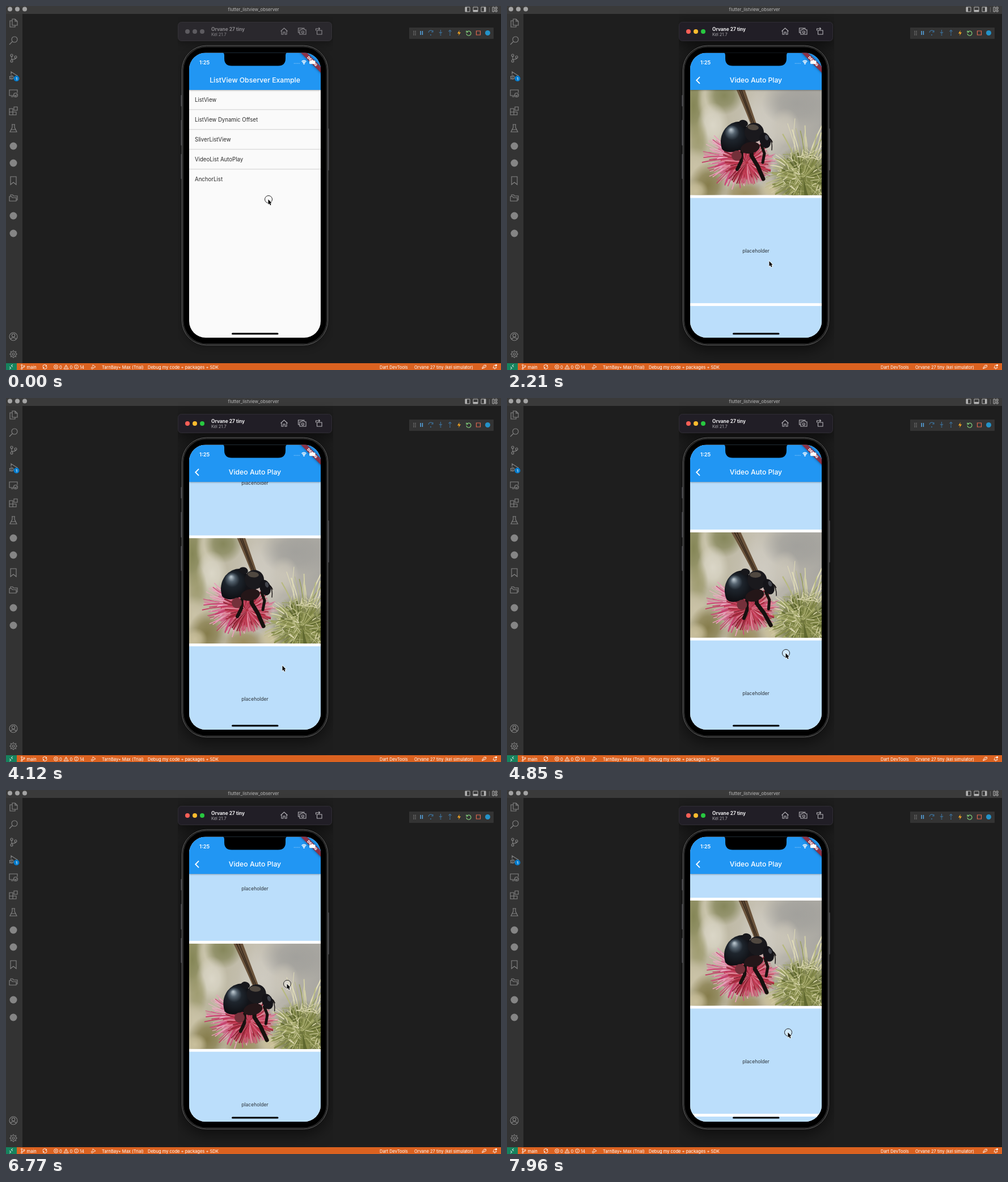
An HTML page with a canvas for the animation above (8 s loop, 873x642 px).

```html
<!DOCTYPE html>
<html lang="en">
<head>
<meta charset="utf-8">
<title>Video list demo</title>
<style>
html, body { margin: 0; width: 100%; height: 100%; overflow: hidden; background: #1e1e1e; }
canvas { display: block; width: 873px; height: 642px; }
</style>
</head>
<body>
<canvas id="stage"></canvas>
<script>
const W = 873, H = 642, LOOP = 8000, TICK = 147.3;
const SANS = 'Inter, Roboto, "Open Sans", sans-serif';
const SCREEN = { x: 323, y: 82.5, w: 232, h: 502.5, r: 29 };
const BAR_END = 148, ITEM = 185.6, PITCH = 190.55;
const canvas = document.getElementById('stage');
const dpr = window.devicePixelRatio || 1;
canvas.width = W * dpr;
canvas.height = H * dpr;
const c = canvas.getContext('2d');

// Tracks: [tick, values...]
const cursorTrack = [
  [0, 463, 341], [2, 463, 341], [7, 463, 274], [13, 463, 274], [15, 463, 450], [17, 463, 450],
  [21, 473.5, 398], [24, 480, 345], [25, 482, 352], [28, 488, 472], [30, 488, 472], [33, 492, 450],
  [37, 506, 262], [38, 506.5, 270], [43, 500, 312], [45, 496, 342], [46, 496, 342],
  [50, 496, 258], [53, 496, 428], [54, 496, 427.5]
];
const scrollTrack = [
  [0, 0], [17, 0], [21, 38], [24, 91.2], [30, 91.2], [33, 101.5], [38, 101.5], [43, 67.5],
  [46, 67.5], [50, 142.5], [53, 142.5], [54, 143.6]
];
const pageTrack = [[9, 0], [10, .3], [11, .75], [12, .94], [13, 1]];
// Bee pose: x, y, tilt
const beeTrack = [
  [14, 0, 0, 0], [15, 0, 0, 0], [21, 7, 10, -.14], [23.9, 4, 6, -.08], [24, 1, -2, 0],
  [28, 2, -2, 0], [33, 6, 10, -.1], [38, 3, 7, .05], [46, 6, 14, -.03], [54, 6, 5, 0]
];
const presses = [[0, 0], [8, 9], [17, 24], [30, 33], [37, 43], [46, 50], [53, 54]];

function sample(track, n) {
  if (n <= track[0][0]) return track[0].slice(1);
  for (let i = 1; i < track.length; i++) {
    const a = track[i - 1], b = track[i];
    if (n <= b[0]) {
      const k = (n - a[0]) / (b[0] - a[0]);
      return a.slice(1).map((v, j) => v + (b[j + 1] - v) * k);
    }
  }
  return track[track.length - 1].slice(1);
}

function seeded(seed) {
  return () => (seed = (seed * 16807) % 2147483647) / 2147483647;
}

function rect(x, y, w, h, fill) {
  c.fillStyle = fill;
  c.fillRect(x, y, w, h);
}

function round(x, y, w, h, r, fill, stroke, lw = 1) {
  c.beginPath();
  c.roundRect(x, y, w, h, r);
  if (fill) { c.fillStyle = fill; c.fill(); }
  if (stroke) { c.strokeStyle = stroke; c.lineWidth = lw; c.stroke(); }
}

function oval(x, y, rx, ry, fill, tilt = 0) {
  c.beginPath();
  c.ellipse(x, y, rx, ry, tilt, 0, 7);
  c.fillStyle = fill;
  c.fill();
}

const dot = (x, y, r, fill) => oval(x, y, r, r, fill);

function text(str, x, y, size, color, align = 'left', weight = 400) {
  c.font = `${weight} ${size}px ${SANS}`;
  c.textAlign = align;
  c.textBaseline = 'alphabetic';
  c.fillStyle = color;
  c.fillText(str, x, y);
}

function icon(d, x, y, color, lw = 1.1, solid = false) {
  const path = new Path2D(d);
  c.save();
  c.translate(x, y);
  c.lineWidth = lw;
  c.strokeStyle = c.fillStyle = color;
  if (solid) c.fill(path); else c.stroke(path);
  c.restore();
}

const ring = (x, y, r) => `M${x + r} ${y}a${r} ${r} 0 1 0 ${-2 * r} 0a${r} ${r} 0 1 0 ${2 * r} 0`;

const BRANCH = ring(-3, -5, 2) + ring(-3, 5, 2) + ring(4, -2, 2) + 'M-3 -3V3M4 0C4 3 -1 1 -3 3';
const BOLT = 'M1 -5L-3 1H0L-1 5L3 -1H0Z';
const SIDE_ICONS = [
  [30, 'M-2 -7H3L7 -3V4H-2ZM3 -7V-3H7M-2 -4H-6V7H3V4'],
  [61, ring(2, -2, 5) + 'M-2 2L-7 7'],
  [92, BRANCH],
  [123, 'M-4 -2V-7L7 0L2 3' + ring(-3, 3, 3) + 'M-3 0V6M-7 1L-6 2M-7 6L-6 5M-7 3H-6'],
  [154, 'M0 4H-7V-6H7V-1M-4 6H0' + ring(4, 3, 3.5) + 'M2 3L4 5L6 2'],
  [185, 'M-7 -4H-1V2H5V7H-7ZM-7 2H-1V7M1 -7H7V-1H1Z'],
  [216, 'M-3 -7H3M-2 -7V-2L-6 6H6L2 -2V-7M-4 2H4'],
  [308, 'M-5 -7H5V7L0 3L-5 7Z'],
  [339, 'M-7 5V-3H-3L-2 -1H5V5ZM-5 -3V-6H-1L0 -4H7V3H5'],
  [583, ring(0, 0, 7) + ring(0, -2, 2.7) + 'M-4.5 5C-4 1 4 1 4.5 5'],
  [614, ring(0, 0, 5) + ring(0, 0, 2) + 'M0 -7V-5M0 5V7M-7 0H-5M5 0H7M-5 -5L-3.6 -3.6M5 5L3.6 3.6M-5 5L-3.6 3.6M5 -5L3.6 -3.6']
];

function drawEditor() {
  rect(0, 0, W, H, '#1e1e1e');
  rect(0, 14, 29, 616, '#333333');
  for (const [y, d] of SIDE_ICONS) icon(d, 13, y, '#858585');
  for (const y of [247, 277, 370, 401]) dot(13, y, 6.5, '#858585');
  dot(18.5, 128, 5, '#007acc');
  text('1', 18.5, 130.5, 6.5, '#fff', 'center', 600);

  round(711, 38, 149, 20, 1, '#333333');
  for (let i = 0; i < 6; i++) rect(718.5 + (i % 2) * 3, 44 + (i >> 1) * 3, 1.3, 1.3, '#999');
  rect(730.5, 44, 1.5, 7, '#58a9e8');
  rect(733.7, 44, 1.5, 7, '#58a9e8');
  icon('M-4 0C-3 -5 3 -5 4 -1M4 -4V-1H1', 749, 47, '#3c6f98');
  icon('M0 -5V1M-2.5 -1L0 1.5L2.5 -1', 766.5, 47, '#3c6f98');
  icon('M0 2V-4M-2.5 -2L0 -4.5L2.5 -2', 783, 47, '#3c6f98');
  for (const x of [749, 766.5, 783]) dot(x, 51, 1.1, '#3c6f98');
  icon(BOLT, 799, 47.5, '#f5a623', 1, true);
  icon('M-3 -2A4 4 0 1 1 -4 1M-4 -4V-1.5H-1', 816, 47.5, '#7cc576', 1.3);
  icon('M-3.5 -3.5H3.5V3.5H-3.5Z', 833, 47.5, '#e0684f', 1.2);
  dot(849.5, 47.5, 4.5, '#2492c8');
}

function drawBars() {
  rect(0, 0, W, 14, '#3a3a3a');
  for (const x of [7, 20, 33]) dot(x, 5.5, 4, '#a3a3a3');
  text('flutter_listview_observer', 436.5, 9, 7.8, '#b9b9b9', 'center');
  for (const x of [814, 828, 842]) icon('M-4 -4H4V4H-4Z', x, 6, '#b4b4b4', 1);
  rect(810, 2, 3, 8, '#b4b4b4');
  rect(824, 7, 8, 3, '#b4b4b4');
  rect(843, 2, 3, 8, '#b4b4b4');
  rect(852, 2, 1, 9, '#666');
  icon('M-4 -4H-1V4H-4ZM1 -4H4V-1H1ZM1 1H4V4H1Z', 862, 6, '#b4b4b4', 1);

  const white = '#fff', y = 639.5;
  rect(0, 630, W, 12, '#db6220');
  rect(0, 630, 19, 12, '#16825d');
  icon('M-3 0L0 2L-3 4M3 -4L0 -2L3 0', 9, 636.5, white, .9);
  c.save();
  c.translate(29.5, 636.5);
  c.scale(.6, .6);
  icon(BRANCH, 0, 0, white, 1.4);
  c.restore();
  text('main', 36.5, y, 7.6, white);
  icon('M-3.5 0A3 3 0 0 1 3 -1M3.5 0A3 3 0 0 1 -3 1M3 -3V-1H1M-3 3V1H-1', 68.5, 636.5, white, .9);
  icon(ring(0, 0, 3.5) + 'M-1.5 -1.5L1.5 1.5M1.5 -1.5L-1.5 1.5', 88, 636.5, white, .8);
  text('0', 94, y, 7.6, white);
  icon('M0 -3.5L4 3.5H-4ZM0 -1V1.5M0 2V3', 106, 636.5, white, .8);
  text('0', 112.5, y, 7.6, white);
  icon(ring(0, 0, 3.5) + 'M0 -.5V2M0 -2V-1', 124, 636.5, white, .8);
  text('14', 130, y, 7.6, white);
  icon('M-1 -3.5L4 0L0 2M-1 -3.5V-1' + ring(-2, 2, 1.6), 154, 636.5, white, .8);
  text('TarnBay+ Max (Trial)', 169, y, 7.5, white);
  text('Debug my code + packages + SDK', 250, y, 7.55, white);
  text('Dart DevTools', 659, y, 7.5, white);
  text('Orvane 27 tiny (kel simulator)', 720, y, 7.5, white);
  icon('M-3 3V1L0 -3H3.5V0L0 2H-1ZM-3.5 3.5L2 -2', 843, 636.5, white, .8);
  icon('M-3 2C-2 0 -2 -3 0 -3C2 -3 2 0 3 2ZM-1 3.5H1', 862, 636.5, white, .8);
  dot(864.5, 633.5, 1.6, white);
}

function drawDevice(focused) {
  c.save();
  c.beginPath();
  c.rect(303, 7, 274, 623);
  c.clip();
  c.shadowColor = focused ? 'rgba(0,0,0,.6)' : 'rgba(0,0,0,.3)';
  c.shadowBlur = focused ? 28 : 14;
  c.shadowOffsetY = focused ? 8 : 4;
  round(303.5, 28, 271.5, 34, 6, '#222');
  round(311, 70, 256, 527.5, 42, '#000');
  c.restore();

  round(303.5, 28.5, 271, 33, 6, focused ? '#211e26' : '#2a282d', focused ? '#2f2d34' : '#343237');
  const lights = focused ? ['#ff5f57', '#febc2e', '#28c840'] : Array(3).fill('#5d5b60');
  lights.forEach((color, i) => dot(320 + i * 13, 45, 4, color));
  text('Orvane 27 tiny', 362, 44, 8.3, focused ? '#efeef0' : '#88868a', 'left', 700);
  text('Kel 21.7', 362, 53, 7.4, focused ? '#aaa8ad' : '#88868a');
  const tint = focused ? '#b5b3b8' : '#8e8c91';
  icon('M-6 0L0 -5.5L6 0M-4.5 -1V5.5H-1.5V1.5H1.5V5.5H4.5V-1', 490.5, 44.5, tint);
  icon('M-4 -2.5H-1L0 -4H4L5 -2.5H7V5.5H-4ZM-4 2.5H-6.5V-5.5H4.5' + ring(1.5, 1.5, 2), 522, 44.5, tint);
  icon('M-3.5 -1.5H5V5.5H-3.5ZM-5.5 -1V-4.5H1.5M-.5 -6.5L1.5 -4.5L-.5 -2.5', 552, 44.5, tint);

  for (const [x, y, h] of [[308, 157, 20], [308, 201, 45], [308, 261, 44], [567.5, 216, 74]])
    round(x, y, 2.5, h, 1, '#39393c');
  round(310.5, 70, 257, 528, 43, '#000', '#6c6c6c', 1);
  round(312.5, 72, 253, 524, 41, null, '#2c2c2c', 1.6);
}

function appBar(title, back) {
  const s = SCREEN;
  c.save();
  c.shadowColor = 'rgba(0,0,0,.4)';
  c.shadowBlur = 3;
  c.shadowOffsetY = 1;
  rect(s.x, s.y, s.w, BAR_END - s.y, '#2196f3');
  c.restore();
  text(title, 439, 135, 12.2, '#fff', 'center', 500);
  if (back) icon('M3 -5.8L-2.8 0L3 5.8', 337, 131, '#fff', 1.8);
}

function drawMenu() {
  rect(SCREEN.x, SCREEN.y, SCREEN.w, SCREEN.h, '#fafafa');
  const rows = ['ListView', 'ListView Dynamic Offset', 'SliverListView', 'VideoList AutoPlay', 'AnchorList'];
  rows.forEach((label, i) => {
    text(label, 333, 169 + i * 35, 9.65, '#2b2b2b');
    if (i < 4) rect(SCREEN.x, 182.3 + i * 35, SCREEN.w, 1, '#cfcfcf');
  });
  appBar('ListView Observer Example', false);
}

function glow(x, y, rx, ry, rgb, a = .9) {
  const g = c.createRadialGradient(0, 0, 0, 0, 0, 1);
  g.addColorStop(0, `rgba(${rgb},${a})`);
  g.addColorStop(.5, `rgba(${rgb},${a * .75})`);
  g.addColorStop(1, `rgba(${rgb},0)`);
  c.save();
  c.translate(x, y);
  c.scale(rx, ry);
  rect(-1, -1, 2, 2, g);
  c.restore();
}

function rays(x, y, count, from, to, colors, rnd, lw, a0 = 0, a1 = 6.283) {
  for (let i = 0; i < count; i++) {
    const a = a0 + (a1 - a0) * (i + rnd()) / count;
    const r = to * (.45 + .55 * rnd()), bend = a + .3 * (rnd() - .5);
    const mid = (from + r) / 2;
    c.beginPath();
    c.moveTo(x + Math.cos(a) * from, y + Math.sin(a) * from * .85);
    c.quadraticCurveTo(x + Math.cos(a) * mid, y + Math.sin(a) * mid * .85,
      x + Math.cos(bend) * r, y + Math.sin(bend) * r * .85);
    c.strokeStyle = colors[Math.floor(rnd() * colors.length)];
    c.lineWidth = lw * (.5 + .9 * rnd());
    c.stroke();
  }
}

function drawBackdrop() {
  const bg = c.createLinearGradient(0, 0, SCREEN.w, 40);
  bg.addColorStop(0, '#b3ad8e');
  bg.addColorStop(.5, '#c6c1b3');
  bg.addColorStop(1, '#aaa8a2');
  rect(0, 0, SCREEN.w, ITEM, bg);
  glow(6, 28, 22, 60, '128,130,80');
  glow(30, 18, 18, 40, '205,200,176');
  glow(60, 10, 34, 34, '128,130,84');
  glow(40, 62, 28, 40, '222,218,204');
  glow(14, 88, 18, 40, '150,148,98', .7);
  glow(130, 62, 44, 60, '208,204,194');
  glow(188, 24, 62, 42, '160,159,155');
  glow(168, 66, 26, 34, '202,197,184');
  glow(8, 135, 30, 34, '204,196,168');
  glow(32, 168, 34, 40, '128,118,66');
  glow(10, 178, 22, 20, '205,195,160');
  glow(96, 182, 40, 24, '150,135,84');
  glow(146, 176, 26, 20, '205,194,150');
  glow(208, 168, 62, 56, '98,104,50');
}

function drawThistle(rnd) {
  const pale = ['#d6d3a6', '#b7b981', '#e0dcb8', '#9aa062'];
  const deep = ['#5f682f', '#7b8243', '#a3a768', '#878c4c'];
  rays(198, 160, 24, 30, 130, pale, rnd, 1.6, 4.35, 5.45);
  glow(198, 152, 56, 54, '112,118,60', 1);
  rays(198, 158, 90, 4, 58, deep, rnd, 3);
  for (let i = 0; i < 26; i++)
    rays(160 + rnd() * 70, 112 + rnd() * 72, 5, 1, 17, pale, rnd, 1.1);
  rays(190, 150, 40, 30, 66, pale, rnd, 1.2, 2.3, 4.6);
}

function drawFlower(rnd) {
  const pinks = ['#dd7ba0', '#e9b0c2', '#cf4f80', '#e8a0ba', '#c23a64'];
  const reds = ['#d0506f', '#a3293c', '#c23850', '#e08b9c', '#8c2334'];
  glow(88, 118, 52, 46, '205,90,125', .75);
  rays(90, 120, 110, 16, 70, pinks, rnd, 1.3, 1.5, 3.9);
  rays(100, 124, 60, 16, 54, pinks, rnd, 1.3, -.4, 1.7);
  glow(100, 130, 46, 38, '176,44,62', 1);
  rays(100, 128, 110, 3, 48, reds, rnd, 1.8);
}

function drawBee() {
  icon('M72 -22L89 -22Q104 22 117 60L107 61Q96 32 72 -22Z', 0, 0, '#6a533b', 1, true);
  icon('M84 -18Q98 22 112 58M80 -16Q98 24 109 58', 0, 0, '#35281d', 1.6);
  c.lineCap = c.lineJoin = 'round';
  icon('M103 92L91 110L90 126L83 140', 0, 0, '#17110f', 6);
  icon('M110 96L108 116L119 134L129 157', 0, 0, '#17110f', 7);
  icon('M126 98L131 112L128 128', 0, 0, '#17110f', 5);
  icon('M139 84Q146 92 144 106M136 82Q143 86 145 92', 0, 0, '#181414', 1.4);
  const shell = c.createRadialGradient(72, 70, 1, 76, 82, 28);
  shell.addColorStop(0, '#b4c0c8');
  shell.addColorStop(.2, '#55636f');
  shell.addColorStop(.45, '#1e252d');
  shell.addColorStop(1, '#0e0e12');
  oval(96, 90, 20, 18, '#141318');
  icon('M56 104Q50 84 62 68Q74 54 92 56Q104 64 99 88Q94 106 78 109Q62 112 56 104Z', 0, 0, shell, 1, true);
  oval(94, 59, 8, 6, '#17171b', .3);
  dot(113, 75, 17, '#1a191d');
  oval(111, 66, 10, 5, '#504840', .1);
  oval(132, 89, 9.5, 14, '#151419', -.3);
  oval(135, 84, 3, 5, '#42444c', -.3);
  oval(106, 102, 17, 10, '#241618', -.2);
  oval(82, 116, 9, 9, '#74303a', .4);
}

function drawVideo(top, n) {
  const [dx, dy, tilt] = sample(beeTrack, n);
  const rnd = seeded(77);
  c.save();
  c.translate(SCREEN.x, top);
  c.beginPath();
  c.rect(0, 0, SCREEN.w, ITEM);
  c.clip();
  drawBackdrop();
  drawThistle(rnd);
  c.save();
  c.translate(dx, dy * .7);
  drawFlower(rnd);
  c.restore();
  c.translate(100 + dx, 83 + dy);
  c.rotate(tilt);
  c.translate(-100, -83);
  drawBee();
  c.restore();
}

function drawVideos(n) {
  const s = SCREEN, [scroll] = sample(scrollTrack, n);
  const playing = n < 13 ? -1 : n < 24 ? 0 : 1;
  rect(s.x, s.y, s.w, s.h, '#fff');
  for (let i = 0; i < 4; i++) {
    const top = BAR_END + i * PITCH - scroll;
    if (i === playing) { drawVideo(top, n); continue; }
    rect(s.x, top, s.w, ITEM, '#bbdefb');
    text('placeholder', 439, top + ITEM / 2 + 3.2, 8.5, '#2b3238', 'center');
  }
  appBar('Video Auto Play', true);
}

function drawOverlay() {
  const s = SCREEN;
  text('1:25', 341, 102.8, 9.2, '#fff', 'left', 600);
  for (let i = 0; i < 4; i++) dot(508.5 + i * 2.8, 101.3, .7, 'rgba(255,255,255,.5)');
  icon('M-4 -1.5Q0 -5 4 -1.5M-2.5 .5Q0 -1.7 2.5 .5', 525.5, 99.5, '#fff', 1.5);
  dot(525.5, 101.7, 1.3, '#fff');
  c.save();
  c.translate(s.x + s.w, s.y);
  c.rotate(Math.PI / 4);
  c.scale(.6187, .6187);
  c.shadowColor = 'rgba(0,0,0,.5)';
  c.shadowBlur = 4;
  rect(-45, 28, 90, 12, '#8c3247');
  c.shadowBlur = 0;
  text('DEBUG', 0, 37.7, 10.2, '#fff', 'center', 900);
  c.restore();
  round(535, 96.3, 10.5, 6, 1.6, '#fff');
  round(398, 576.6, 82.5, 3, 1.5, '#000');
  icon('M-58 -1Q-54 0 -54 5V10Q-54 23 -41 23H41Q54 23 54 10V5Q54 0 58 -1Z', 439, 82.5, '#000', 1, true);
}

function drawCursor(n) {
  const [x, y] = sample(cursorTrack, n);
  if (presses.some(([a, b]) => n >= a && n <= b)) {
    c.beginPath();
    c.arc(x, y, 6.5, 0, 7);
    c.fillStyle = 'rgba(255,255,255,.3)';
    c.fill();
    c.strokeStyle = '#222';
    c.lineWidth = 1;
    c.stroke();
  }
  const arrow = 'M-.5 0V9L1.5 7.2L3 10.5L4.5 9.8L3.1 6.6H5.6Z';
  icon(arrow, x, y, '#fff', 1.4);
  icon(arrow, x, y, '#000', 1, true);
}

function draw(now) {
  const n = Math.floor((now % LOOP + 10) / TICK);
  const s = SCREEN, [page] = sample(pageTrack, n);
  c.setTransform(dpr, 0, 0, dpr, 0, 0);
  drawEditor();
  drawBars();
  drawDevice(n > 0);

  c.save();
  c.beginPath();
  c.roundRect(s.x, s.y, s.w, s.h, s.r);
  c.clip();
  if (page < 1) {
    c.save();
    c.translate(-page * s.w / 3, 0);
    drawMenu();
    c.restore();
  }
  if (page > 0) {
    c.save();
    c.translate((1 - page) * s.w, 0);
    c.beginPath();
    c.rect(s.x, s.y, s.w, s.h);
    c.clip();
    drawVideos(n);
    c.restore();
  }
  drawOverlay();
  c.restore();
  drawCursor(n);
}

const start = performance.now();
function loop() {
  draw(performance.now() - start);
  requestAnimationFrame(loop);
}
loop();
</script>
</body>
</html>
```
